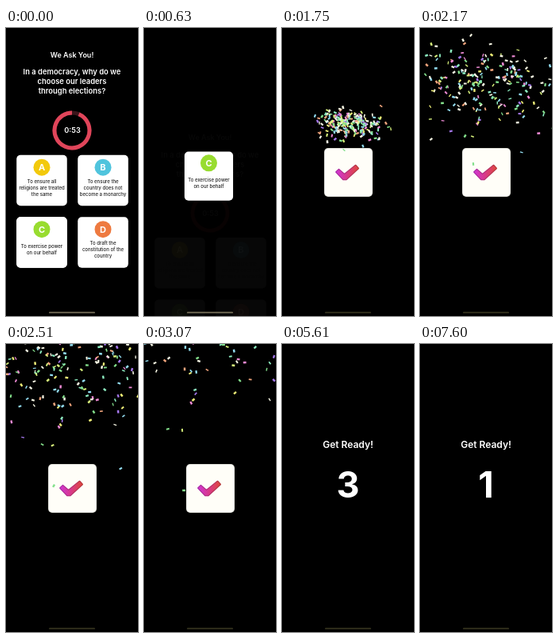
An HTML page with a canvas that plays this animation: 166x360 px, repeating every 8000 ms.

```html
<!DOCTYPE html>
<html lang="en">
<head>
<meta charset="utf-8">
<title>Quiz round</title>
<style>
html, body { margin: 0; height: 100%; overflow: hidden; background: #000; }
canvas { display: block; width: 166px; height: 360px; }
</style>
</head>
<body>
<canvas id="stage"></canvas>
<script>
const LOOP = 8000, W = 166, H = 360;
const canvas = document.getElementById('stage');
const ctx = canvas.getContext('2d');
const ratio = window.devicePixelRatio || 1;
canvas.width = W * ratio;
canvas.height = H * ratio;

const answers = [
  { x: 45, y: 190.5, letter: 'A', color: '#f2c90c', lines: ['To ensure all', 'religions are treated', 'the same'] },
  { x: 122, y: 190.5, letter: 'B', color: '#50c4dd', lines: ['To ensure the', 'country does not', 'become a monarchy'] },
  { x: 45, y: 268, letter: 'C', color: '#98dc30', lines: ['To exercise power', 'on our behalf'] },
  { x: 122, y: 268, letter: 'D', color: '#ee7a40', lines: ['To draft the', 'constitution of the', 'country'] }
];
const chosen = answers[2];
const center = { x: 83.5, y: 180.5 };
const tick = [[-15.3, -0.5], [-12, -3.6], [-5, 2.6], [9, -8.8], [12.4, -5], [-2.7, 8.8], [-6.5, 8.8]];

const clamp = v => Math.min(1, Math.max(0, v));
const progress = (t, from, to) => clamp((t - from) / (to - from));
const mix = (a, b, p) => a + (b - a) * p;
const easeInOut = p => p < 0.5 ? 4 * p ** 3 : 1 - 4 * (1 - p) ** 3;

function seeded(seed) {
  return () => (seed = (seed * 16807) % 2147483647) / 2147483647;
}

const random = seeded(4217);
const bell = () => (random() + random() + random() + random() - 2) * 1.73;
const palette = ['#f0f078', '#d8f27c', '#f4f4e2', '#f4f4e2', '#8cecc0', '#84e08c', '#92dcf0', '#ee8ad4', '#a678ee', '#f0a47c'];
const confetti = Array.from({ length: 240 }, () => ({
  u: bell(),
  v: bell() * mix(0.6, 1.4, random()),
  turn: random() * 6.28,
  spin: (random() - 0.5) * 0.012,
  color: palette[Math.floor(random() * palette.length)]
}));

function text(str, x, y, size, weight, color = '#fff') {
  ctx.font = `${weight} ${size}px Inter, sans-serif`;
  ctx.fillStyle = color;
  ctx.fillText(str, x, y);
}

function bar(x, y, w, h, r, color) {
  ctx.fillStyle = color;
  ctx.beginPath();
  ctx.roundRect(x, y, w, h, r);
  ctx.fill();
}

function arc(x, y, r, from = 0, to = Math.PI * 2) {
  ctx.beginPath();
  ctx.arc(x, y, r, from, to);
}

// Draws around a local origin, then restores the canvas state.
function placed(x, y, sx, sy, draw) {
  ctx.save();
  ctx.translate(x, y);
  ctx.scale(sx, sy);
  draw();
  ctx.restore();
}

function answerFace({ letter, color, lines }, size = 63.5) {
  bar(-size / 2, -size / 2, size, size, 5, '#fff');
  arc(0, -16.3, 10.5);
  ctx.fillStyle = color;
  ctx.fill();
  text(letter, 0, -15.8, 11, 700);
  lines.forEach((line, i) =>
    text(line, 0, 9.5 + (i - (lines.length - 1) / 2) * 8, 6, 500, '#222'));
}

function checkFace() {
  bar(-30.5, -30.5, 61, 61, 5, '#d6d6cf');
  bar(-29.8, -29.8, 59.6, 59.6, 4.5, '#fffef8');
  const gradient = ctx.createLinearGradient(-16, 0, 13, 0);
  gradient.addColorStop(0, '#cf36d8');
  gradient.addColorStop(0.5, '#d83a88');
  gradient.addColorStop(1, '#e0483a');
  ctx.beginPath();
  tick.forEach(([x, y]) => ctx.lineTo(x, y));
  ctx.closePath();
  ctx.lineJoin = 'round';
  ctx.lineWidth = 2;
  ctx.strokeStyle = ctx.fillStyle = gradient;
  ctx.stroke();
  ctx.strokeStyle = 'rgba(70, 10, 50, 0.3)';
  ctx.stroke();
  ctx.fill();
}

function quiz() {
  text('We Ask You!', 83, 34.5, 9, 600);
  ['In a democracy, why do we', 'choose our leaders', 'through elections?']
    .forEach((line, i) => text(line, 83, 55.5 + i * 12, 9.4, 600));
  ctx.lineCap = 'butt';
  ctx.lineWidth = 5;
  ctx.strokeStyle = '#3c151b';
  arc(83, 128, 22);
  ctx.stroke();
  ctx.strokeStyle = '#e0455a';
  arc(83, 128, 22, -Math.PI / 2 + 0.4, Math.PI * 1.5);
  ctx.stroke();
  text('0:53', 83.5, 128.5, 9.2, 600);
  answers.forEach(a => placed(a.x, a.y, 1, 1, () => answerFace(a)));
}

function card(t) {
  const move = easeInOut(progress(t, 20, 820));
  const flip = Math.cos(Math.PI * easeInOut(progress(t, 890, 1600)));
  let scale = 1;
  if (t > 4400) {
    scale = t < 4460 ? mix(1, 0.85, progress(t, 4400, 4460))
      : t < 4650 ? mix(0.85, 1.07, easeInOut(progress(t, 4460, 4650)))
      : mix(1.07, 0.3, progress(t, 4650, 4950));
  }
  ctx.globalAlpha = 1 - progress(t, 4680, 4950);
  placed(mix(chosen.x, center.x, move), mix(chosen.y, center.y, move),
    Math.abs(flip) * scale, scale,
    () => flip > 0 ? answerFace(chosen, mix(63.5, 61, move)) : checkFace());
  ctx.globalAlpha = 1;
}

function burst(t) {
  const age = t - 1600;
  if (age < 0 || t > 3650) return;
  const spreadX = 0.6 * age ** 0.7;
  const spreadY = 0.145 * age ** 0.83;
  const middle = 137 - 0.12 * age;
  ctx.globalAlpha = 1 - progress(t, 3200, 3650);
  for (const p of confetti) {
    ctx.save();
    ctx.translate(85 + p.u * spreadX, middle + p.v * spreadY);
    ctx.rotate(p.turn + p.spin * age);
    ctx.fillStyle = p.color;
    const height = 1.2 + 1.3 * Math.abs(Math.cos(p.turn + age * 0.006));
    ctx.fillRect(-1.9, -height / 2, 3.8, height);
    ctx.restore();
  }
  ctx.globalAlpha = 1;
}

function render(t) {
  ctx.setTransform(ratio, 0, 0, ratio, 0, 0);
  ctx.fillStyle = '#000';
  ctx.fillRect(0, 0, W, H);
  ctx.textAlign = 'center';
  ctx.textBaseline = 'middle';

  if (t < 820) {
    const leave = easeInOut(progress(t, 20, 820));
    ctx.globalAlpha = (1 - leave) ** 1.2;
    placed(0, 109 * leave, 1, 1, quiz);
    ctx.globalAlpha = 1;
  }
  if (t < 4950) card(t);
  burst(t);
  if (t >= 5610) {
    text('Get Ready!', 83, 126.5, 12, 600);
    text(t < 6590 ? '3' : t < 7600 ? '2' : '1', 83, 178, 45, 700);
  }
  bar(54, 354.8, 58, 1.8, 0.9, t < 840 ? '#77705a' : '#36341f');
}

function play(now) {
  render(now % LOOP);
  requestAnimationFrame(play);
}
requestAnimationFrame(play);
</script>
</body>
</html>
```
